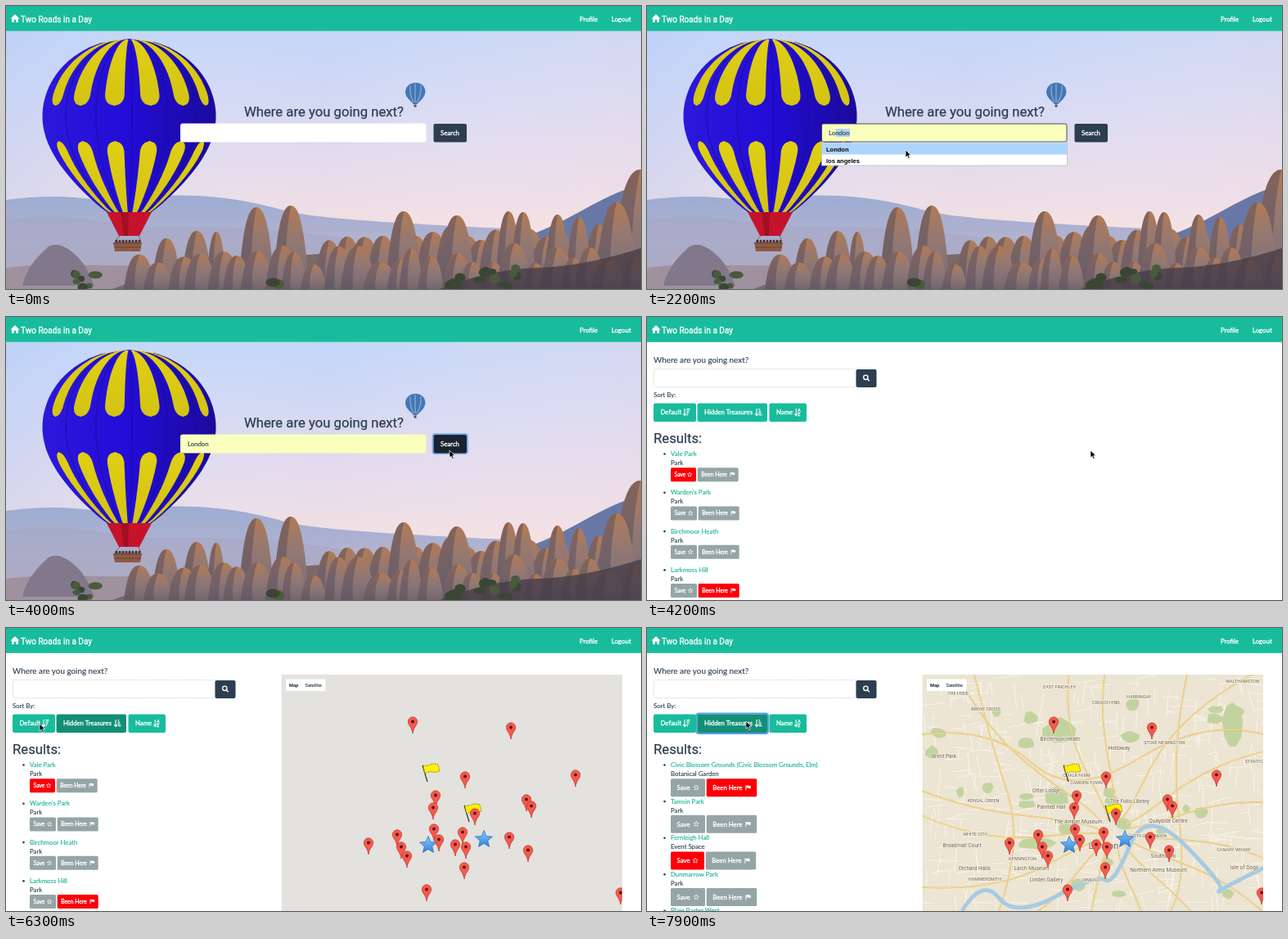
An HTML page for the animation above (8000 ms loop, 776 by 346 pixels).

```html
<!DOCTYPE html>
<html lang="en">
<head>
<meta charset="utf-8">
<title>City search</title>
<style>
html, body { margin: 0; width: 100%; height: 100%; overflow: hidden; background: #fff; }
svg { display: block; width: 100vw; height: 100vh; font-family: Lato, sans-serif; font-size: 7.8px; }
text { white-space: pre; fill: #2c3e50; stroke: #2c3e50; stroke-width: .12px; }
.head { font-family: Roboto, sans-serif; font-size: 16.7px; stroke-width: .25px; }
.w { fill: #fff; stroke: #fff; stroke-width: .32px; }
.link { fill: #17b092; stroke: #17b092; }
.sys { font: bold 7.5px "Liberation Sans", Arial, sans-serif; fill: #000; stroke: none; }
.map text { font-family: Roboto, sans-serif; font-size: 5.7px; }
.lbl text { text-anchor: middle; fill: #6f6353; stroke: #f6f1e4; stroke-width: 1.4px; paint-order: stroke; }
</style>
</head>
<body>
<svg id="stage" viewBox="0 0 776 346" preserveAspectRatio="none"></svg>
<script>
const NAVY = '#2c3e50', GREEN = '#18bc9c', DARK = '#128f76', GRAY = '#95a5a6', RED = '#fb0007';
const $ = id => document.getElementById(id);
const rect = (x, y, w, h, fill, more = '') =>
  `<rect x="${x}" y="${y}" width="${w}" height="${h}" fill="${fill}" ${more}/>`;
const path = (d, fill, more = '') => `<path d="${d}" fill="${fill}" ${more}/>`;
const line = (d, color, width, more = '') => path(d, 'none', `stroke="${color}" stroke-width="${width}" ${more}`);
const text = (x, y, s, more = '') => `<text x="${x}" y="${y}" ${more}>${s}</text>`;
const group = (id, body, more = '') => `<g id="${id}" ${more}>${body}</g>`;
const oval = (x, y, rx, ry, fill) => `<ellipse cx="${x}" cy="${y}" rx="${rx}" ry="${ry}" fill="${fill}"/>`;
const poly = pts => 'M' + pts.map(p => p.map(v => v.toFixed(1)).join(' ')).join('L') + 'Z';
const rad = deg => deg * Math.PI / 180;
const repeat = (n, f) => Array.from({ length: n }, (_, i) => f(i)).join('');

let seed = 7;
const rnd = (a = 0, b = 1) => a + (b - a) * (seed = seed * 16807 % 2147483647) / 2147483647;

// Closed ring of n corners; radius(i) scales the half sizes
const ring = (x, y, rx, ry, n, radius) => poly(Array.from({ length: n }, (_, i) => {
  const a = rad(i * 360 / n - 90), k = radius(i);
  return [x + k * rx * Math.cos(a), y + k * ry * Math.sin(a)];
}));
const star = (x, y, r, fill, more) => path(ring(x, y, r, r, 10, i => i % 2 ? .45 : 1), fill, more);

// ---- landscape ----
const halfWidth = y => y < 135
  ? 106 * Math.sqrt(Math.max(0, 1 - ((135 - y) / 95) ** 2))
  : 27 + 79 * Math.cos(Math.PI / 2 * (y - 135) / 117) ** .9;

// Part of the envelope between two angles; round = 1 rounds the lower end, -1 the upper one
function gore(mid, half, y0, y1, round) {
  const left = [], right = [];
  for (let i = 0; i <= 40; i++) {
    const y = y0 + (y1 - y0) * i / 40;
    const d = round > 0 ? y1 - y : round < 0 ? y - y0 : 99;
    const k = d < 14 ? Math.sqrt(1 - (1 - d / 14) ** 2) : 1;
    left.push([150.5 + halfWidth(y) * Math.sin(rad(mid - half * k)), y]);
    right.unshift([150.5 + halfWidth(y) * Math.sin(rad(mid + half * k)), y]);
  }
  return poly(left.concat(right));
}

function balloon() {
  let s = path(gore(0, 90, 40, 252, 0), 'url(#blue)');
  for (let a = -59; a < 70; a += 24.5) {
    s += line(gore(a + 12, 0, 44, 252, 0), '#1a0c96', .5);
    s += path(gore(a, 6.8, 41, 122, 1), 'url(#yellow)') + path(gore(a, 6.4, 165, 252, -1), 'url(#yellow)');
  }
  s += path('M123 252H178L163 281H138Z', '#c5132c') + path('M140 252H150L149 281H144Z', '#a30f22');
  s += line('M139 281L133 288M162 281L165 288', '#6b4a3a', .7);
  s += repeat(8, i => oval(135 + i * 4, 288, 1.5, 2.2, i % 2 ? '#5b2d2a' : '#332a3a'));
  return s + path('M131 289H166L164 300H133Z', '#8d5b45') + line('M131 290H166M133 295H165', '#5f392d', .8);
}

// Weathered cone: lit face, shaded left flank
function rock(x, top, w) {
  const h = 346 - top;
  const outline = `M${x - w} 346C${x - w * .8} ${top + h * .35} ${x - w * .55} ${top} ${x} ${top}`
    + `S${x + w * .8} ${top + h * .35} ${x + w} 346Z`;
  const flank = `M${x - w} 346C${x - w * .8} ${top + h * .35} ${x - w * .55} ${top} ${x} ${top}`
    + `Q${x - w * .35} ${top + h * .4} ${x - w * .3} 346Z`;
  return path(outline, 'url(#stone)') + path(flank, '#594c5a', 'opacity=".5"');
}
const tall = [[306, 246], [348, 244], [486, 251], [551, 256], [614, 251], [632, 252], [674, 255], [700, 258]];
const rocks = () => repeat(20, i => rock(400 + i * 20 + rnd(-5, 5), rnd(266, 288), rnd(16, 24)))
  + tall.map(([x, y]) => rock(x, y, x > 600 ? 16 : 22)).join('')
  + rock(233, 275, 19) + rock(257, 276, 12) + rock(196, 284, 18) + rock(775, 200, 36) + rock(746, 240, 26)
  + repeat(26, i => rock(165 + i * 24 + rnd(-6, 6), rnd(290, 316), rnd(14, 22)));
const bushes = (n, x0, x1, y0) => repeat(n, () =>
  oval(rnd(x0, x1), rnd(y0, 344), rnd(4, 9), rnd(3, 6), rnd() < .5 ? '#4a5a3c' : '#3a4634'));

const photo = rect(0, 31, 776, 315, 'url(#sky)') + rect(0, 31, 776, 315, 'url(#glow)')
  + path('M0 237Q60 229 110 237T190 232C260 229 310 242 340 250S440 264 610 272V346H0Z', 'url(#haze)')
  + path('M0 262C60 250 100 262 150 268S280 262 420 285V346H0Z', '#a4a5c3', 'opacity=".5"')
  + path('M640 280C690 262 715 240 758 224L776 226V346H640Z', '#6878a6')
  + path('M0 320C60 312 110 320 180 316V346H0Z', '#a0919f')
  + path('M20 342C26 318 40 305 52 294Q62 289 72 295C92 306 100 322 108 342Z', '#82788c')
  + path('M130 346C200 318 300 308 400 302S600 292 776 285V346Z', '#7b6868')
  + rocks()
  + path('M530 346Q590 322 650 320T776 296V346Z', '#433a44', 'opacity=".75"')
  + bushes(14, 540, 650, 320) + bushes(7, 80, 110, 326) + bushes(3, 325, 338, 336)
  + balloon()
  + path('M488 105C489 90 512 90 512.5 105C512 112 505 117 502 120H498C495 116 488 112 488 105Z', '#4377b4')
  + line('M494 97Q493 108 498 118M500 95V118M507 97Q508 108 502 118', '#a9c6e6', 1.2, 'opacity=".7"')
  + rect(498.5, 120.5, 3, 3, '#5d4b55');

const field = (fill, border) => rect(213.5, 144, 299.5, 22, fill, `rx="2" stroke="${border}" stroke-width=".9"`);
const searchPage = photo
  + text(291, 135, 'Where are you going next?', 'class="head"')
  + group('plain', field('#fff', '#fff')) + group('focused', field('#fff', NAVY))
  + group('preview', field('#faffbd', NAVY) + rect(230.5, 150, 17.5, 10, '#b4d3ef'))
  + group('picked', field('#faffbd', '#faffbd'))
  + text(222, 158, '', 'id="query"') + line('M222.5 151V159', NAVY, .6, 'id="caret"')
  + group('menu', rect(213.5, 167, 300, 28, '#fff', 'stroke="#b9bec6" stroke-width=".8"')
    + rect(214, 167.5, 299, 14, '#add5fb', 'id="option"')
    + text(219, 178, 'London', 'class="sys"') + text(219, 191.5, 'los angeles', 'class="sys"'))
  + rect(521.5, 143, 42.5, 24, 'none', 'id="ring" rx="3" stroke="#7fb0ea" stroke-width="2"')
  + rect(522.5, 144, 40.5, 22.5, NAVY, 'rx="2" id="go"') + text(531, 158, 'Search', 'class="w"');

// ---- results page ----
const flagIcon = (x, y, k) => path('M0 0H1V7H0ZM1.5 .5Q3 -.3 4.5 .5T7 .5V4Q5.500 4.700 4.200 4T1.5 4Z', '#fff',
  `transform="translate(${x} ${y}) scale(${k})"`);

function action(x, y, w, h, size, label, on) {
  const pad = size > 7 ? 8 : 5, end = x + w - pad;
  const icon = label == 'Save'
    ? star(end - 2.9, y + h / 2, size * .42, 'none', 'stroke="#fff" stroke-width=".7"')
    : flagIcon(end - size * .75, y + h / 2 - 3, size / 8.5);
  return rect(x, y, w, h, on ? RED : GRAY, 'rx="1.600"')
    + text(x + pad - .5, y + h / 2 + size * .35, label, `class="w" style="font-size:${size}px"`) + icon;
}
// Rows of [name, kind, lit button]; save and been are the button widths
const results = (rows, pitch, h, size, save, been) => rows.map(([name, kind, lit], i) => {
  const y = 170 + i * pitch, w = lit == 'save' ? save - 1 : save;
  return oval(21.5, y - 2.5, 1.3, 1.3, NAVY) + text(29, y, name, 'class="link"') + text(29, y + 11, kind)
    + action(29, y + 14.2, w, h, size, 'Save', lit == 'save')
    + action(30.7 + w, y + 14.2, been, h, size, 'Been Here', lit == 'been');
}).join('');
const byDefault = results([['Vale Park', 'Park', 'save'], ["Warden's Park", 'Park'], ['Birchmoor Heath', 'Park'],
  ['Larkmoss Hill', 'Park', 'been']], 47.3, 17, 6.8, 32, 50);
const byTreasure = results([['Civic Blossom Grounds (Civic Blossom Grounds, Elm)', 'Botanical Garden', 'been'], ['Tamsin Park', 'Park'],
  ['Fernleigh Hall', 'Event Space', 'save'], ['Dunmarrow Park', 'Park'], ['Plain Barter West', 'Shop']], 44.6, 22, 7.8, 42, 61.5);

const arrow = x => line(`M${x} 112V120M${x - 2} 118L${x} 120.5L${x + 2} 118`, '#fff', 1.1);
const bars = (x, width) => repeat(4, i => rect(x, 112 + i * 2.3, width(i), 1.3, '#fff'));
const letter = (y, s) => text(184.3, y, s, 'class="w" style="font-size:5px"');
const sortButton = (id, x, w, label, icon) => rect(x, 105.5, w, 22.5, GREEN, `rx="2" id="${id}"`)
  + text(x + 8.5, 119.2, label, 'class="w"') + icon;

// ---- map ----
const labels = [['THE HYDE', 380, 82], ['EAST FINCHLEY', 504, 74], ['CROUCH END', 561, 93], ['HARRINGAY', 601, 86],
  ['WALTHAMSTOW', 728, 67], ['BRENT CROSS', 414, 101], ['Birchmoor Heath', 505, 138], ['Holloway', 577, 149],
  ['STOKE NEWINGTON', 632, 142], ['Brent Park', 363, 159], ['STRATFORD', 746, 165], ['CHALK FARM', 525, 182],
  ['CAMDEN TOWN', 537, 191], ['Otter Lodge', 488, 201], ['Painted Hall', 494, 221], ['KENSAL GREEN', 411, 213],
  ['The Folio Library', 590, 214], ['The Amber Museum', 527, 239], ['Quayside Centre', 637, 238], ['CITY OF LONDON', 614, 256],
  ['WHITE CITY', 401, 254], ['Broadmall Court', 385, 268], ['London', 558, 270], ['KENSINGTON', 459, 284],
  ['Orchard Halls', 400, 296], ['Larch Museum', 470, 296], ['Southwark', 631, 281], ['Northern Arms Museum', 625, 298],
  ['CANARY WHARF', 717, 273], ['Isle of Dogs', 730, 295], ['HAMMERSMITH', 413, 309], ['Linden Gallery', 488, 310], ['PIMLICO', 543, 310]];
const labelSize = s => s == 'London' ? 11 : s == s.toUpperCase() ? 5.5 : 6.5;

function tiles() {
  const streets = repeat(420, i => {
    const a = rad(-18 + 90 * (i % 2) + rnd(0, 30)), r = rnd(8, 30);
    return `M${rnd(336, 753)} ${rnd(57, 346)}l${r * Math.cos(a)} ${r * Math.sin(a)}`;
  });
  const spokes = repeat(15, i => {
    const a = rad(i * 24 + rnd(0, 10)), at = (r, k) => `${570 + r * Math.cos(a + k)} ${250 + r * .85 * Math.sin(a + k)}`;
    return `M${at(18, 0)}C${at(80, .15)} ${at(150, -.2)} ${at(290, rnd(0, .3))}`;
  });
  const main = spokes + 'M336 130Q420 120 470 165T600 160T753 130M400 57Q420 140 440 200T430 346M660 57Q640 150 650 230T640 346';
  const park = (x, y, rx, ry) => path(ring(x, y, rx, ry, 9, () => rnd(.75, 1.1)), '#c3d3a0');
  return rect(336.5, 57, 416.5, 289, '#ece5d3') + line(streets, '#faf6ea', .9)
    + park(505, 126, 24, 17) + park(500, 206, 17, 15) + park(474, 264, 25, 8) + park(716, 118, 13, 34)
    + repeat(26, () => park(rnd(340, 750), rnd(60, 340), rnd(5, 13), rnd(4, 9)))
    + line(main, '#dcb96a', 1.8) + line(main, '#f6dc97', 1.1)
    + line('M385 346Q410 305 430 330T500 328T560 308T590 266T660 268T700 322T744 298T765 282', '#a8cbe2', 5)
    + group('', labels.map(([s, x, y]) => text(x, y, s, `style="font-size:${labelSize(s)}px"`)).join(''), 'class="lbl"');
}
const pins = [[497, 115], [617, 122], [561, 182], [696, 180], [525, 205], [522, 220], [636, 210], [642, 218], [573, 227],
  [523, 246], [558, 250], [478, 253], [615, 256], [529, 259], [443, 263], [549, 265], [483, 268], [562, 268], [638, 272],
  [490, 279], [560, 293], [514, 320], [751, 324]];
const pin = ([x, y]) => `<g transform="translate(${x} ${y})">`
  + path('M0 14C-1 6 -5.7 4 -5.7 -.5A5.7 5.7 0 0 1 5.7 -.5C5.7 4 1 6 0 14Z', '#f7594d', 'stroke="#b8352c" stroke-width=".7"')
  + oval(0, -.5, 2, 2, '#5c1411') + '</g>';
const flag = (x, y) => `<g transform="translate(${x} ${y})">` + line('M0 0L6 20', '#222', 1.1)
  + path('M.5 0Q5 1 9 -1T19 -1L21 7Q16 9 12 8T3 10Z', '#fdf001', 'stroke="#6b6410" stroke-width=".8" stroke-dasharray="1.5 1"') + '</g>';
const mark = (x, y) => star(x, y, 11, 'url(#bluestar)', 'stroke="#2b6fc0" stroke-width=".8"');

const map = rect(336.5, 57, 416.5, 289, '#e3e2de', 'id="blank"') + group('tiles', tiles())
  + group('control', rect(342, 62.5, 48.5, 14.5, '#fff', 'rx="1"')
    + text(346, 71.8, 'Map', 'font-weight="bold"') + text(365.5, 71.8, 'Satellite'))
  + group('marks', flag(509, 168) + flag(560, 217) + pins.map(pin).join('') + mark(516, 265.5) + mark(584, 258.5));

const resultPage = rect(0, 31, 776, 315, '#fff')
  + text(8, 55.5, 'Where are you going next?', 'style="font-size:9.9px"')
  + rect(8.5, 63.5, 247, 22, '#fff', 'rx="2" stroke="#cfd6da" stroke-width=".8" stroke-dasharray="2 1"')
  + rect(255.5, 64, 25, 22, NAVY, 'rx="2"')
  + line('M269.3 75.8L271.8 78.3M270 73.8A2.7 2.7 0 1 0 264.6 73.8A2.7 2.7 0 1 0 270 73.8', '#fff', 1.4)
  + text(8, 98, 'Sort By:')
  + rect(60.5, 104.5, 87.5, 24.5, 'none', 'id="sortRing" rx="3" stroke="#5b9de8" stroke-width="2"')
  + sortButton('first', 8, 52, 'Default', arrow(46) + bars(48.5, i => 4 - i * .8))
  + sortButton('second', 61.5, 85.5, 'Hidden Treasures', arrow(134) + bars(136.5, i => 1.6 + i * .8))
  + sortButton('third', 149.5, 45.5, 'Name', arrow(182.2) + letter(116, 'A') + letter(121, 'Z'))
  + text(8, 153.5, 'Results:', 'class="head"')
  + group('listA', byDefault) + group('listB', byTreasure)
  + group('map', map, 'class="map" clip-path="url(#mapBox)"');

// Evenly spaced colours, downwards or to the right
const grad = (id, down, ...colors) => `<linearGradient id="${id}" x2="${1 - down}" y2="${down}">`
  + colors.map((c, i) => `<stop offset="${i / (colors.length - 1)}" stop-color="${c}"/>`).join('') + '</linearGradient>';

$('stage').innerHTML = '<defs>'
  + grad('sky', 1, '#c0d3f8', '#d0d6f4', '#e2d9ec', '#f1dde0', '#f2dedd')
  + grad('glow', 0, '#b9d0f859', '#ffffff0d', '#f6e2e659')
  + grad('haze', 1, '#9dacd3', '#b3b3cf', '#bbaebd')
  + grad('stone', 1, '#b27a54', '#98796f', '#867377', '#74666c')
  + grad('blue', 0, '#2c18dc', '#230cd6', '#1a0a9c')
  + grad('yellow', 1, '#e0cf12', '#d3c314')
  + grad('bluestar', 1, '#8cc8fb', '#2f82dc')
  + `<clipPath id="mapBox">${rect(336.5, 57, 416.5, 289, '#000')}</clipPath></defs>`
  + group('search', searchPage) + group('results', resultPage)
  + rect(0, 0, 776, 30.7, GREEN)
  + path('M11 10L16.5 15.5H15V20H12.3V16.8H9.7V20H7V15.5H5.5Z', '#fff')
  + text(18, 20, 'Two Roads in a Day', 'class="w" style="font:10px Roboto,sans-serif"')
  + text(701, 18.5, 'Profile', 'class="w"') + text(740, 18.5, 'Logout', 'class="w"')
  + path('M0 0V9L2.1 7.2L3.6 10.5L5.2 9.8L3.7 6.6H6.5Z', '#000', 'id="cursor" stroke="#fff" stroke-width=".7"');

// ---- motion ----
// Pointer moves: start, end, x, y
const moves = [[300, 800, 336, 153], [1500, 1900, 316, 176], [2600, 3400, 542, 163], [4400, 4700, 228, 127],
  [4900, 6200, 41, 117], [6500, 7000, 121, 114]];

function pointer(t) {
  let x = 420, y = 230;
  for (const [from, to, nx, ny] of moves) {
    const u = Math.min(1, Math.max(0, (t - from) / (to - from))), e = u * u * (3 - 2 * u);
    x += (nx - x) * e;
    y += (ny - y) * e;
  }
  return [x, y];
}

// When each part is on screen: from, to
const shown = {
  search: [0, 4200], plain: [0, 900], focused: [900, 1900], caret: [900, 1900], menu: [1100, 2400], option: [1900, 2400],
  preview: [1900, 2400], picked: [2400, 4200], ring: [3600, 4200],
  results: [4200], blank: [4500], control: [5000], marks: [5100], tiles: [6800],
  listA: [4200, 7300], listB: [7300], sortRing: [7300], cursor: [300],
};

function draw(now) {
  const t = Math.floor(now % 8000 / 100) * 100;
  const [x, y] = pointer(t);
  for (const id in shown) {
    const [from, to = 8000] = shown[id];
    $(id).style.display = t >= from && t < to ? '' : 'none';
  }
  const typed = t < 1100 ? '' : t < 1500 ? 'l' : t < 1900 ? 'lo' : 'London';
  $('query').textContent = typed;
  $('caret').setAttribute('transform', `translate(${typed.length * 2.8})`);
  $('cursor').setAttribute('transform', `translate(${x.toFixed(1)} ${y.toFixed(1)})`);

  $('go').setAttribute('fill', x > 522 ? '#1a242f' : NAVY);
  const late = t >= 6500;
  $('first').setAttribute('fill', late && x < 60 ? DARK : GREEN);
  $('second').setAttribute('fill', x < 147 && !(late && x < 61) ? DARK : GREEN);
}

const start = performance.now();
function tick() {
  draw(performance.now() - start);
  requestAnimationFrame(tick);
}
tick();
</script>
</body>
</html>
```
